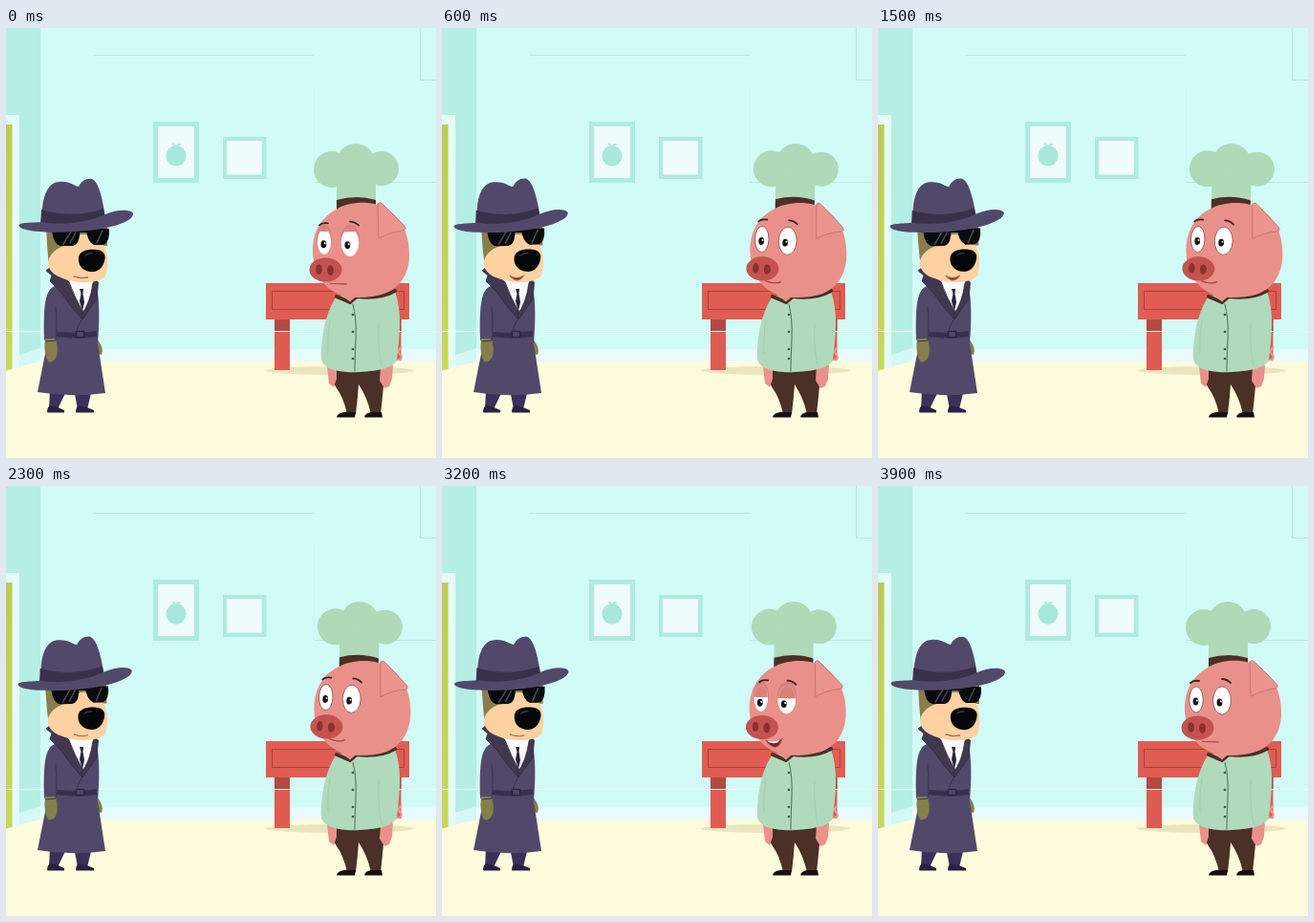
Write an HTML page that moves like this. It is 450 by 450 pixels and loops after 4000 ms.

```html
<!DOCTYPE html>
<html lang="en">
<head>
<meta charset="utf-8">
<title>Detective and chef</title>
<style>
html, body { margin: 0; width: 100%; height: 100%; overflow: hidden; background: #d1fbf6; }
svg { display: block; width: 100vw; height: 100vh; }
.line { fill: none; stroke-linecap: round; stroke-linejoin: round; }
</style>
</head>
<body>
<svg viewBox="0 0 450 450">
  <defs>
    <linearGradient id="door" x1="0" y1="0" x2="0" y2="1">
      <stop offset="0" stop-color="#bdcb55"/><stop offset="1" stop-color="#c9d858"/>
    </linearGradient>
    <clipPath id="clipL"><ellipse cx="333" cy="223.500" rx="7.2" ry="13.6"/></clipPath>
    <clipPath id="clipR"><ellipse cx="360" cy="224.500" rx="9.4" ry="14.6"/></clipPath>
  </defs>

  <g id="room">
    <rect width="450" height="450" fill="#d1fbf6"/>
    <path d="M0 0H36V347L0 357Z" fill="#b5eee4"/>
    <path d="M14 342L36 335V349L14 355Z" fill="#d3f8f5"/>
    <rect x="36" y="336.500" width="414" height="14" fill="#eafbff"/>
    <path d="M0 358L36 349H450V450H0Z" fill="#fffbdc"/>
    <path d="M0 91H14V355L0 358Z" fill="#e4fbf8"/>
    <path d="M0 101H6.5V357L0 358.5Z" fill="url(#door)"/>
    <g class="line" stroke="#b9e3df" stroke-width=".8">
      <path d="M92 28.5H322M433.5 0V54.5H450M323 161.5H450"/>
      <path d="M322.5 62V161" opacity=".25"/>
    </g>
    <path d="M154 98H202V162H154ZM227 114H272.500V158H227Z" fill="#aeebe1"/>
    <path d="M159 103H197V157H159ZM231 118H268V153.500H231Z" fill="#effbfc"/>
    <ellipse cx="178" cy="133.800" rx="10.500" ry="10.800" fill="#a8e8dc"/>
    <path class="line" d="M178 126Q177 123 175 121.500M178 124Q180 121.500 182 122" stroke="#a8e8dc" stroke-width="1.800"/>
    <ellipse cx="349" cy="358.500" rx="78" ry="4.500" fill="#eae5c0"/>
    <path d="M281 304H297V358H281ZM397 304H413.500V348H397Z" fill="#de5c52"/>
    <path d="M281 304H297V317H281ZM397 304H413.500V317H397Z" fill="#b24a43"/>
    <rect x="272" y="267" width="150" height="38" fill="#df5d53"/>
    <rect x="278.500" y="275.500" width="138" height="19" fill="none" stroke="#ad4038"/>
    <path d="M0 317.500H450" stroke="#f4fffe" stroke-width="1.200"/>
  </g>

  <g id="dog">
    <path d="M46 378H64L54 399H45ZM71 378H90L85 399H75Z" fill="#3b305a"/>
    <path d="M43 402Q43 397 46 395Q54 396 61 400V402.500H44ZM73 402Q73 397 76 395Q84 396 92 400V402.500H74Z" fill="#2a2042"/>
    <path d="M95 325L99 331Q102 337 100 342L96 341Z" fill="#857f4a"/>
    <path d="M51 270C41 274 39 290 40 326L43 331L33 381Q68 387 104 382L96 330C98 306 98 287 95 271Z" fill="#52496a"/>
    <path d="M41 325H52Q55 336 53 343Q50 351 44 349Q39 341 41 325Z" fill="#857f4a"/>
    <path class="line" d="M52 292Q54 312 52 327L42 328" stroke="#3d3454"/>
    <path d="M53 318Q76 320 95 317V323Q76 326 53 323Z" fill="#3a304e"/>
    <rect x="73.500" y="317.500" width="8" height="6" fill="#52496a" stroke="#2b2341" stroke-width="1.300"/>
    <path d="M62 262H94L90 284L80 300Z" fill="#f8f9fb"/>
    <path d="M77 273H81L80.500 278L82 287L80 296L77 286L78.500 278Z" fill="#29233d"/>
    <path d="M48 249L42 254L48 259L46 265L57 276Q67 291 79 304L82 299Q72 283 66 266Z" fill="#41374f" stroke="#302946" stroke-width=".8"/>
    <path d="M93 263L96.500 266L95 284L80 305L79 300Q88 288 91 267Z" fill="#41374f" stroke="#302946" stroke-width=".8"/>
    <path class="line" d="M80 304Q75 311 74 318" stroke="#3a304e"/>
    <g id="dogHead">
      <path d="M42 207H106V228H64L45 249Q43 232 42 207Z" fill="#897d4c"/>
      <path d="M45 241C49 233 57 227 71 227L78 216H84L91 226H101C107 231 108 250 104 260C97 268 72 268 57 261C46 257 42 248 45 241Z" fill="#fdd1a0"/>
      <path d="M48 210H77Q78 226 70 228H57Q49 226 48 210ZM84 210H108Q109 224 102 227H92Q85 224 84 210ZM76 210H86V214H76Z" fill="#0a0b0e"/>
      <path class="line" d="M68 213L60 226M73 214L67 225M101 212L95 225" stroke="#48494e" stroke-width="1.500"/>
      <path d="M76 240C77 233 86 231 95 232C103 233 105 238 103 244C101 252 95 256 88 255C80 254 75 248 76 240Z" fill="#060709"/>
      <path class="line" d="M83 238Q86 235.500 90 236" stroke="#35343a" stroke-width="1.600"/>
      <path id="dogMouth" stroke="#a9694c" fill="#783b32" stroke-linecap="round"/>
      <path d="M36 207L38 190C39 174 45 161 56 161C67 160 70 165 76 166C79 160 84 157 90 158C97 161 101 178 104 198Q71 217 36 207Z" fill="#52496a"/>
      <path d="M37 190Q70 200 102 189L104 200Q70 214 36 207Z" fill="#3b304b"/>
      <path d="M13.500 207C13 203 28 204 37 203C61 207 88 203 104 195C115 190 130 189 133 194C134 203 107 211 75 213C43 215 16 213 13.500 207Z" fill="#52496a"/>
    </g>
  </g>

  <g id="pig">
    <path class="line" d="M410 347Q416 347 413 342Q409 339 413 335" stroke="#ec9a94" stroke-width="2.200"/>
    <path d="M338 354H396Q396 370 392 404H382Q378 386 369 373Q368 388 366 404H357Q353 386 346 377Q340 368 338 354Z" fill="#4a3026"/>
    <path d="M346 407Q347 403 354 402H366L365 407.500H347ZM375 407Q376 403 382 402H393L394 407.500H376Z" fill="#141112"/>
    <path d="M336 354H346V367L343 376L338 372ZM392 353H405L404 367L401 375L396 377L391 369Z" fill="#e9918a"/>
    <path d="M346 281C335 295 329 325 330 347C333 358 351 361 370 360C391 359 407 355 409 347C412 322 415 299 407 275Z" fill="#b0dabb"/>
    <path class="line" d="M363 289Q367 303 366 326T365 359" stroke="#4f6a58" stroke-width="1"/>
    <path class="line" d="M390 310Q389 334 393 354M339 306Q336 326 337 340" stroke="#9cc9a8" stroke-width=".7"/>
    <g fill="#40594a">
      <circle cx="363" cy="300" r="1.300"/><circle cx="363" cy="318" r="1.300"/><circle cx="363" cy="336" r="1.300"/><circle cx="363" cy="346" r="1.300"/>
    </g>
    <path class="line" d="M346 281L360 287L367 281Q391 284 407 275" stroke="#4a3026" stroke-width="4"/>
    <path d="M347 276H372L360 286.500Z" fill="#ea908a"/>
    <g id="pigHead">
      <g fill="#b0d9b8">
        <circle cx="341" cy="148" r="19"/><circle cx="366" cy="141" r="20"/><circle cx="393" cy="147" r="18"/>
        <path d="M346 148H387V186H346Z"/>
      </g>
      <path d="M346 180Q367 174 387 180V190H346Z" fill="#4a3026"/>
      <path d="M345 190C360 181 385 180 400 190C416 201 423 220 422 240C421 260 411 272 396 278C380 283 358 284 345 277C329 269 320 250 321 229C322 210 332 197 345 190Z" fill="#ea908a"/>
      <path d="M390 220L389 184Q391 181 394 184L417 207Q420 211 415 212Q402 213 390 220Z" fill="#ec958e" stroke="#c8706b" stroke-width=".9"/>
      <g id="face">
        <g id="eyes"></g>
        <g class="line" stroke="#372225" stroke-width="1.800">
          <path id="browL" d="M327 206Q330 203 336 204"/>
          <path id="browR" d="M360 202Q365 202 369 206"/>
        </g>
      </g>
      <ellipse cx="334.500" cy="253" rx="17" ry="12.600" fill="#c4534f"/>
      <ellipse cx="327.500" cy="252.500" rx="3.300" ry="5.200" fill="#8b3031"/>
      <ellipse cx="339.500" cy="253.500" rx="3.500" ry="5.200" fill="#8b3031"/>
      <path id="pigMouth" stroke="#a4504c" fill="#792428" stroke-linecap="round"/>
      <path id="teeth" fill="#fff5f1"/>
    </g>
  </g>
</svg>
<script>
const LOOP = 4000, STEP = 100;
const $ = id => document.getElementById(id);
const set = (id, name, value) => $(id).setAttribute(name, value);

const eyes = [
  { id: 'L', x: 333, y: 223.5, rx: 7.2, ry: 13.6, px: 332.5 },
  { id: 'R', x: 360, y: 224.5, rx: 9.4, ry: 14.6, px: 357.5 }
];

$('eyes').innerHTML = eyes.map(e => `
  <ellipse id="rim${e.id}" cx="${e.x}" cy="${e.y - 4}" rx="${e.rx + .8}" ry="${e.ry}" fill="#d9807b"/>
  <g clip-path="url(#clip${e.id})">
    <rect x="${e.x - 10}" y="${e.y - 16}" width="20" height="32" fill="#fff"/>
    <g id="pupil${e.id}">
      <ellipse cx="${e.px}" cy="${e.y + 2}" rx="2.9" ry="3.9" fill="#171315"/>
      <circle cx="${e.px + 1.3}" cy="${e.y + 1}" r="1" fill="#fff"/>
    </g>
    <path id="lid${e.id}" fill="#d9807b"/>
  </g>
  <ellipse id="edge${e.id}" cx="${e.x}" cy="${e.y}" rx="${e.rx}" ry="${e.ry}" fill="none" stroke="#6e3f3e" stroke-width=".7"/>`).join('');

const leanKeys = [[0, 0], [200, 0], [500, 1], [3000, 1], [3200, .5], [3500, 0], [4000, 0]];
const lidKeys = [[0, .3], [200, 1], [350, 1], [550, 0], [2950, 0], [3150, 1], [3500, 1], [3700, 0], [3900, 0], [4000, .3]];
const smileKeys = [[0, 0], [300, 0], [600, 1], [3000, 1], [3400, 0], [4000, 0]];

function track(keys, t) {
  const i = Math.max(1, keys.findIndex(k => k[0] >= t));
  const [t0, a] = keys[i - 1], [t1, b] = keys[i];
  const p = (t - t0) / (t1 - t0);
  return a + (b - a) * p * p * (3 - 2 * p);
}

// Syllables peak every 300 ms around the given moment.
function talk(t, from, to, peak) {
  return t < from || t > to ? 0 : .55 + .45 * Math.cos((t - peak) * Math.PI / 150);
}

function drawEye(e, lid) {
  const top = e.y - e.ry - 3, y = e.y - e.ry - 1 + lid * (e.ry - 1);
  const cover = Math.min(1, lid * 3);
  set('lid' + e.id, 'd', `M${e.x - 11} ${top}H${e.x + 11}V${y}Q${e.x} ${y + 1.5 * lid} ${e.x - 11} ${y}Z`);
  set('rim' + e.id, 'opacity', cover);
  set('edge' + e.id, 'opacity', 1 - cover);
  set('pupil' + e.id, 'transform', `translate(${-lid * .5} ${lid * 2.5})`);
}

function draw(t) {
  const lean = track(leanKeys, t), lid = track(lidKeys, t), smile = track(smileKeys, t);
  set('pigHead', 'transform', `rotate(${lean * 1.6} 372 285)`);
  set('face', 'transform', `translate(0 ${-lean * 1.4})`);
  set('dogHead', 'transform', `rotate(${-lean} 75 265)`);
  eyes.forEach(e => drawEye(e, lid));
  set('browL', 'transform', `translate(${lean * 2 + lid * 3} ${-lean + lid})`);
  set('browR', 'transform', `translate(${lean * .8} ${lean + lid * 2})`);

  const bark = talk(t, 500, 2200, 600);
  set('dogMouth', 'd', `M71 ${260 - bark}Q78 ${263 + bark} 86 ${261 - bark * 2}Q79 ${263 + bark * 6} 71 ${260 - bark}Z`);

  const oink = talk(t, 3000, 3500, 3200);
  const x = 339.5 - smile * 2, y = 267.5 - smile * 2;
  set('pigMouth', 'd', `M${x} ${y}Q${x + 8} ${y + smile * 4 + oink * 2} ${x + 17} ${y + .5 - oink * 2}` +
    `Q${x + 12} ${y + smile * 4 + oink * 13} ${x} ${y}Z`);
  set('teeth', 'd', `M${x + 2} ${y + .5}Q${x + 9} ${y + 2} ${x + 15} ${y - 1}L${x + 13} ${y + 2}Q${x + 8} ${y + 4} ${x + 3} ${y + 2}Z`);
  set('teeth', 'opacity', oink > .4 ? 1 : 0);
}

function tick(now) {
  draw(Math.floor(now % LOOP / STEP) * STEP);
  requestAnimationFrame(tick);
}
draw(0);
requestAnimationFrame(tick);
</script>
</body>
</html>
```
